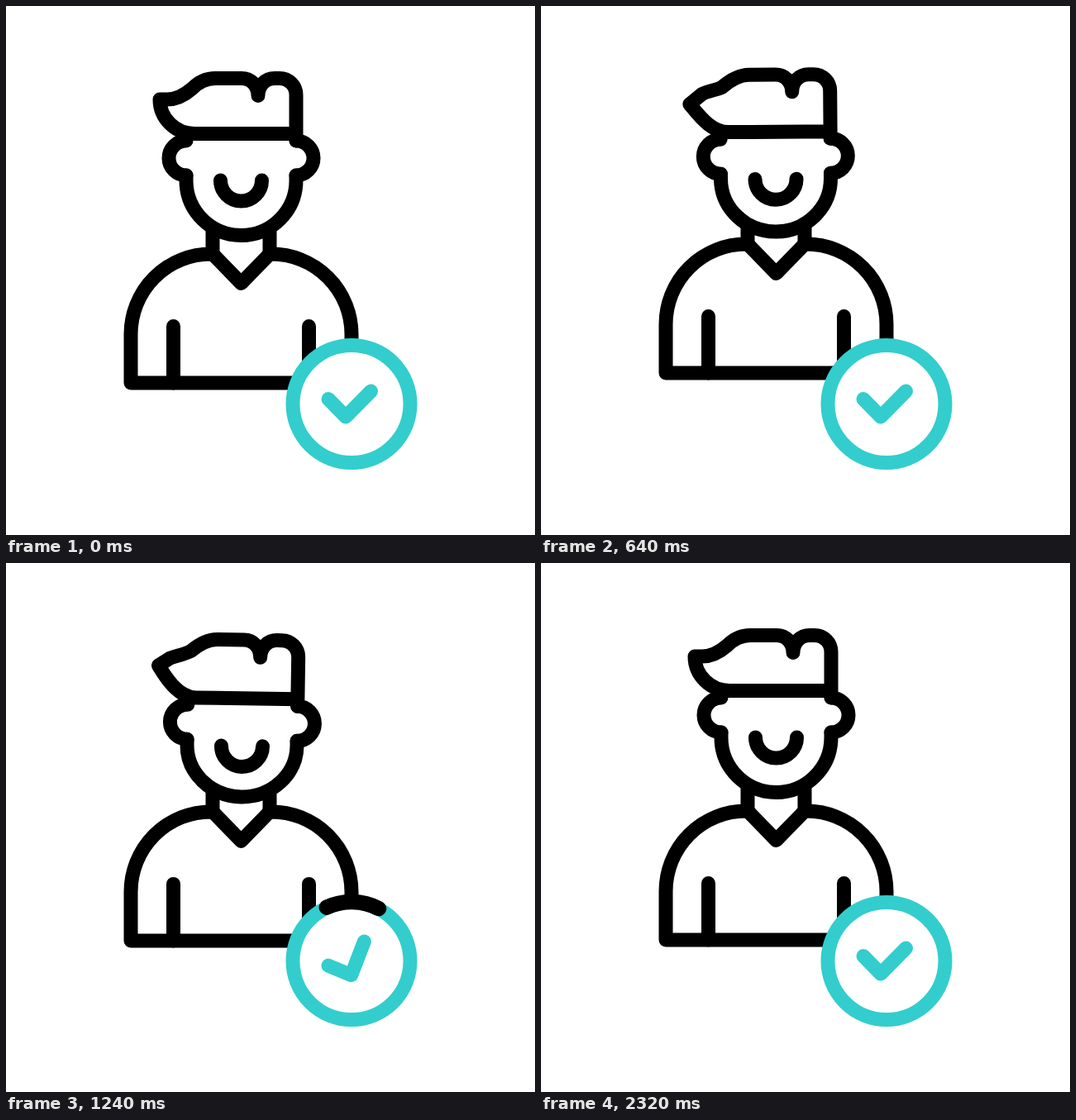
An HTML page that plays this animation: 640 by 640 pixels, repeating every 2600 ms.

```html
<!DOCTYPE html>
<html lang="en">
<head>
<meta charset="utf-8">
<title>Approved user</title>
<style>
  html, body { margin: 0; width: 100%; height: 100%; overflow: hidden; background: #fff; }
  svg { display: block; width: 100%; height: 100%; }
  path, circle { fill: none; stroke: #000; stroke-width: 17; stroke-linecap: round; stroke-linejoin: round; }
  .solid { fill: #fff; }
  .teal { stroke: #33cdcd; }
  #arc { stroke-width: 18.4; }
</style>
</head>
<body>
<svg viewBox="0 0 640 640">
  <g id="body">
    <path d="M250 256V300M319 256V300"/>
    <path d="M151 456V397A97 97 0 0 1 248 300H250L284.5 335.5L319 300H321A97 97 0 0 1 418 397V456Z"/>
    <path d="M202.500 387.500V456M366.500 387.500V456"/>
  </g>
  <g id="head">
    <path id="face" class="solid"/>
    <path id="ears"/>
    <path id="smile"/>
    <path id="hair" class="solid"/>
  </g>
  <circle class="solid teal" cx="418" cy="481.500" r="71"/>
  <path id="arc"/>
  <path id="check" class="teal" d="M390 475.500L411 497L441.500 466"/>
</svg>
<script>
  const LOOP = 2600, STEP = 40;
  const el = id => document.getElementById(id);
  const [body, head, face, ears, smile, hair, arc, check] =
    ['body', 'head', 'face', 'ears', 'smile', 'hair', 'arc', 'check'].map(el);

  // Each track is a list of [time, value] pairs.
  const tracks = {
    bodyY: [[0, 0], [360, 13], [680, -13], [1000, 6], [1320, 0]],
    headY: [[0, 0], [400, 21], [760, -13], [1080, 10], [1420, 0]],
    tilt: [[0, 0], [360, -2.8], [980, 2.8], [1400, 0]],
    nod: [[0, 0], [400, 7.5], [800, 0], [1000, 0], [1220, 4.6], [1480, 0]],
    sharp: [[0, 0], [300, 1], [640, 1], [1000, 0.9], [1240, 0.8], [1500, 0]],
    droop: [[0, 0], [400, 1.15], [640, 1], [1000, 0.4], [1240, 0.75], [1500, 0]],
    tick: [[700, 0], [1000, 10], [1300, -27], [1600, 10], [2320, 0]],
    arcEnd: [[1095, -25], [1676, 335]],
    arcStart: [[1240, -25], [2240, 335]]
  };

  const mix = (a, b, k) => a + (b - a) * k;
  const ease = k => (1 - Math.cos(Math.PI * k)) / 2;

  function at(track, t) {
    if (t <= track[0][0]) return track[0][1];
    for (let i = 1; i < track.length; i++) {
      const [t0, a] = track[i - 1], [t1, b] = track[i];
      if (t < t1) return mix(a, b, ease((t - t0) / (t1 - t0)));
    }
    return track[track.length - 1][1];
  }

  function rim(deg) {
    const a = deg * Math.PI / 180;
    return `${418 + 71.5 * Math.sin(a)} ${481.5 - 71.5 * Math.cos(a)}`;
  }

  function hairPath(sharp, droop, nod) {
    const p = (x0, y0, x1, y1) => `${mix(x0, x1, sharp)} ${mix(y0, y1, sharp)} `;
    const tipX = 186 - 5 * sharp, tipY = 113 + 9.5 * droop, band = 154.5 + nod;
    return `M${tipX} ${tipY}L` + p(195, 113, 196, 110.5) +
      'C' + p(208, 113, 203, 106.5) + p(217, 107, 211, 106.5) + p(225, 100, 220, 102.5) +
      'C' + p(232, 93, 230, 94) + '241 87.5 253 87.5H285' +
      'C296 87.5 305 96 305 108.5C305 96 314 87.5 325 87.5H331' +
      `A20 20 0 0 1 351 107.5V${163 + nod}V${band}H228` +
      `C${mix(205, 206, sharp)} ${band} ` +
      `${tipX + 10 * sharp} ${mix(136, tipY + 12, sharp)} ${tipX} ${tipY}Z`;
  }

  function draw(t) {
    const v = {};
    for (const name in tracks) v[name] = at(tracks[name], t);

    body.setAttribute('transform', `translate(0 ${v.bodyY})`);
    head.setAttribute('transform', `translate(0 ${v.headY}) rotate(${v.tilt} 284.5 280)`);
    check.setAttribute('transform', `rotate(${v.tick} 418 481.5)`);

    const n = v.nod * 0.85, top = 163 + n, low = 205 + n, ry = 66.5 - n;
    face.setAttribute('d', `M218 ${low}v6a66.500 ${ry} 0 0 0 133 0v-6`);
    ears.setAttribute('d', `M218 ${top}a21 21 0 0 0 0 42M351 ${top}a21 21 0 0 1 0 42`);
    smile.setAttribute('d', `M259.500 ${211 + v.nod * 1.1}a25 25 0 0 0 50 0`);
    hair.setAttribute('d', hairPath(v.sharp, v.droop, n));

    const span = v.arcEnd - v.arcStart;
    arc.setAttribute('d', span > 0.1
      ? `M${rim(v.arcStart)}A71.500 71.500 0 ${span > 180 ? 1 : 0} 1 ${rim(v.arcEnd)}`
      : '');
  }

  const begin = performance.now();
  function tick() {
    const t = (performance.now() - begin) % LOOP;
    draw(Math.floor(t / STEP) * STEP);
    requestAnimationFrame(tick);
  }
  tick();
</script>
</body>
</html>
```
